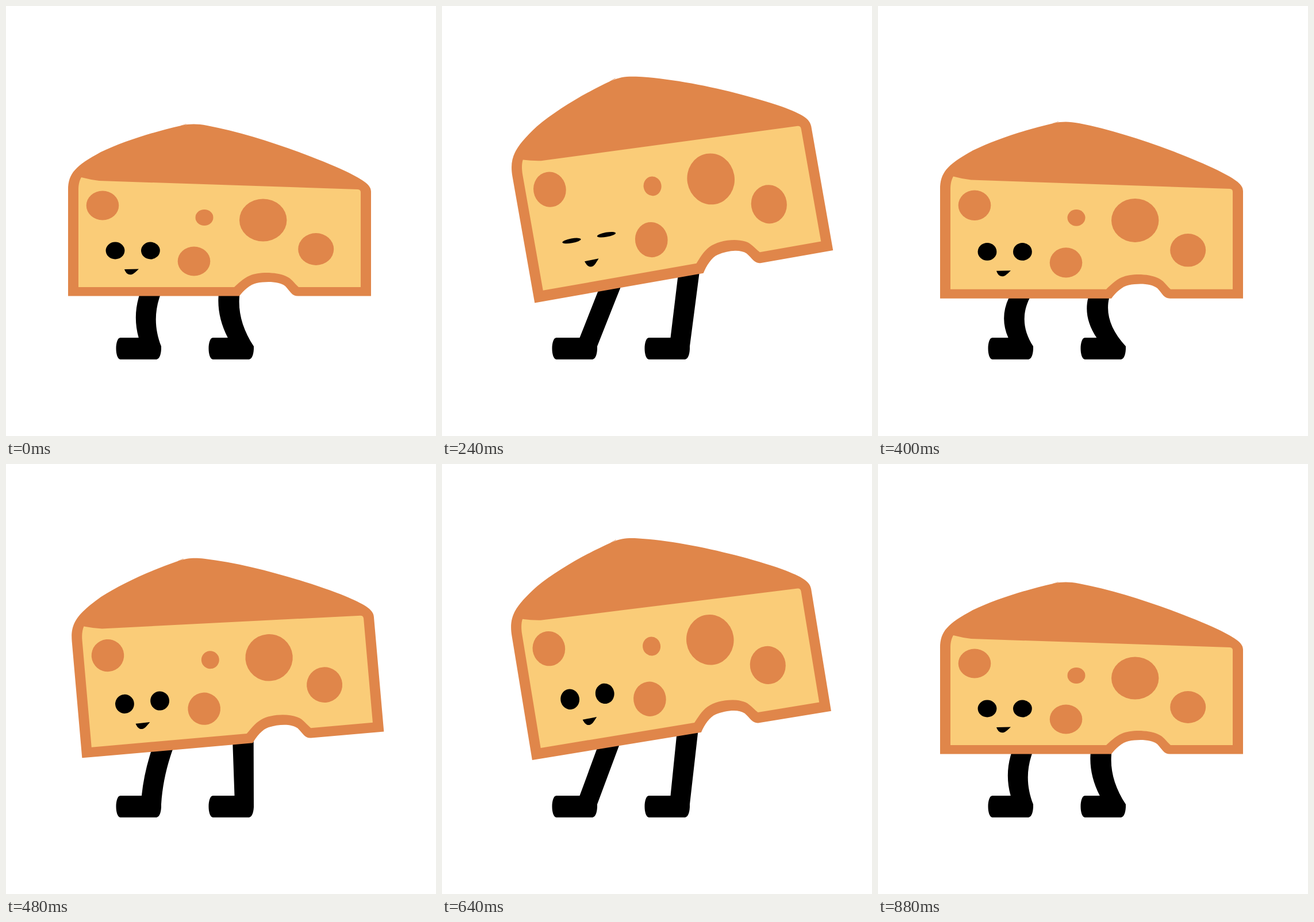
An HTML page that plays this animation: 748 px wide and 748 px high, repeating every 960 ms.

```html
<!DOCTYPE html>
<html lang="en">
<head>
<meta charset="utf-8">
<title>Walking cheese</title>
<style>
  html, body { margin: 0; width: 100%; height: 100%; overflow: hidden; background: #fff; }
  svg { display: block; width: 100vw; height: 100vh; }
  .rind { fill: #e0864a; }
  .paste { fill: #facc78; }
</style>
</head>
<body>
<svg viewBox="0 0 748 748">
  <path id="leftLeg"/>
  <path id="rightLeg"/>
  <g id="body">
    <path class="rind" d="M108 504.6V320C108 291 121 278 165 254C203 236 252 220 305 208C322 204.6 332 205 350 208C430 223 530 259.5 590 287C625 304 635 312 635 323V504.6H508C497 504.6 495 497 486 487.5C476 479.5 455 478.5 436 482C425 484 413 495 406 504.6Z"/>
    <path d="M304 208.4L314 205.3" stroke="#e0864a" stroke-width=".6"/>
    <path class="paste" d="M126 489V320C126 310 128 303 131 298Q146 302 162 304L612 319Q617 319.5 617 324V489H509C500 481 497 474 487 470C470 462.5 440 462 424 469C412 474 404 483 397 489Z"/>
    <g class="rind">
      <ellipse cx="168" cy="347" rx="28.3" ry="25.5"/>
      <ellipse cx="345" cy="368" rx="15.5" ry="14"/>
      <ellipse cx="447.2" cy="372.5" rx="41.2" ry="37"/>
      <ellipse cx="539.2" cy="423" rx="31" ry="28"/>
      <ellipse cx="327" cy="444" rx="28.3" ry="25.5"/>
    </g>
    <ellipse class="eye" cx="190" cy="425.5" rx="16.4" ry="15"/>
    <ellipse class="eye" cx="251.4" cy="425.5" rx="16.4" ry="15"/>
    <path d="M206 458L231 457.5C224 464 221 467.3 216 467.3C211 467.3 208 463.5 206 458Z"/>
  </g>
</svg>
<script>
  const STEP = 80, LOOP = 960;
  const MID = { x: 371.5, y: 355.1 }, HALF = 149.5;
  const LEFT = { id: 'leftLeg', heel: 191.5, hip: 258.4, ankle: 48, give: 1.2 };
  const RIGHT = { id: 'rightLeg', heel: 352.5, hip: 395.4, ankle: 45, give: 1.6 };

  const $ = id => document.getElementById(id);
  const eyes = document.querySelectorAll('.eye');
  const clamp = v => Math.min(1, Math.max(0, v));
  const ramp = (t, from, to) => (1 - Math.cos(Math.PI * clamp((t - from) / (to - from)))) / 2;

  // two hops: up, down, up, down
  const tiltAt = t => ramp(t, 0, 175) - ramp(t, 240, 400) + ramp(t, 400, 560) - ramp(t, 613, 773);
  const stretchAt = t => ramp(t, 0, 204) - ramp(t, 240, 450) + ramp(t, 400, 560) - ramp(t, 600, 800);
  const eyeAt = t => clamp(Math.abs(t - 205) / 160);

  // one side of a leg, bowed to the left by bow
  function edge(x0, y0, x1, y1, bow) {
    const at = k => `${x0 + (x1 - x0) * k - bow} ${y0 + (y1 - y0) * k}`;
    return `C${at(1 / 3)} ${at(2 / 3)} ${x1} ${y1}`;
  }

  // the lower the body sits over a leg, the more the knee bends
  function drawLeg({ id, heel, hip, ankle, give }, tilt, floorAt) {
    const straight = hip + 33.6 * tilt;
    const low = floorAt(straight - 7.4);
    const bend = .85 * Math.max(0, low - 496);
    const x = straight - bend, y = low - 5;
    $(id).setAttribute('d',
      `M${x - 18} ${y}` + edge(x - 18, y, heel + ankle - give * bend, 577, 1.1 * bend) +
      `H${heel + 7.5}c-10 0 -10 37.7 0 37.7h63q7 -1.7 8 -17.7l0 -5` +
      edge(heel + 78.5, 592, x + 18.5, y, 1.65 * bend) + 'Z');
  }

  function draw(t) {
    const tilt = tiltAt(t), scale = 1 + .204 * stretchAt(t);
    const angle = 10 * tilt, rad = angle * Math.PI / 180;
    const cx = MID.x + 18 * tilt, cy = MID.y - 61.7 * tilt;
    const floorAt = x => cy + HALF * scale / Math.cos(rad) - Math.tan(rad) * (x - cx);

    $('body').setAttribute('transform',
      `translate(${cx} ${cy}) rotate(${-angle}) scale(1 ${scale}) translate(${-MID.x} ${-MID.y})`);
    eyes.forEach(eye => eye.setAttribute('ry', 15 * eyeAt(t)));
    drawLeg(LEFT, tilt, floorAt);
    drawLeg(RIGHT, tilt, floorAt);
  }

  const start = performance.now();
  function tick() {
    draw(Math.floor((performance.now() - start) / STEP) * STEP % LOOP);
    requestAnimationFrame(tick);
  }
  tick();
</script>
</body>
</html>
```
